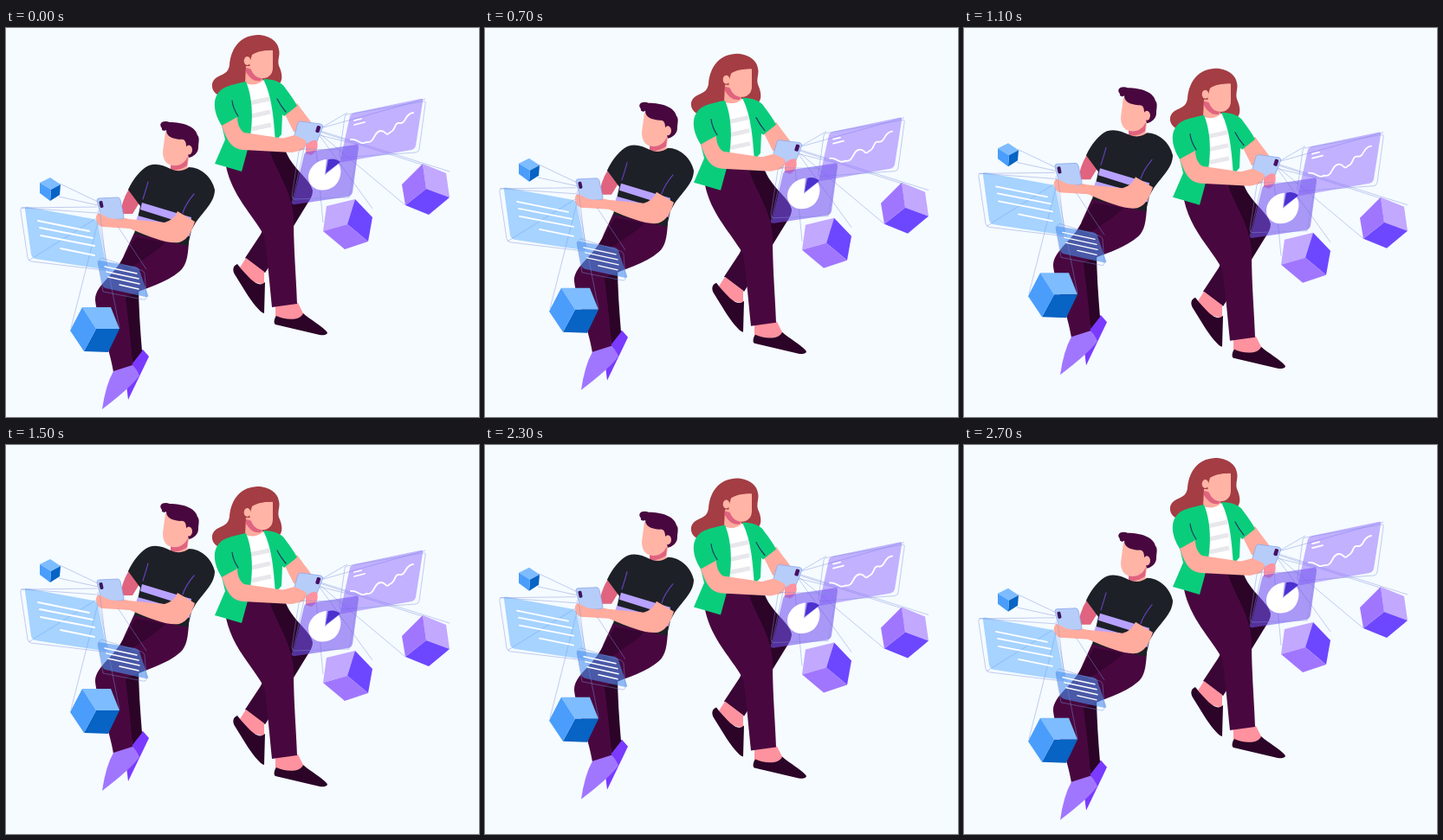
Animation of 546 by 450 pixels, one loop 2.8 s. Source, as an HTML page:

```html
<!DOCTYPE html>
<html lang="en">
<head>
<meta charset="utf-8">
<title>Two people floating with phones</title>
<style>
html, body { margin: 0; width: 100%; height: 100%; overflow: hidden; background: #f5fbff; }
svg { display: block; width: 546px; height: 450px; }
.line { fill: none; stroke: #8190d8; stroke-width: .6; opacity: .75; }
.ink { fill: none; stroke: #fff; stroke-width: 1.8; stroke-linecap: round; stroke-linejoin: round; }
.crease { fill: none; stroke: #243a64; stroke-width: 1.2; stroke-linecap: round; }
.skin { fill: #ffab9e; }
.face { fill: #ffb4a6; }
.shade { fill: #e0637f; }
.pink { fill: #ff929f; }
.plum { fill: #48083f; }
.dark { fill: #2b0428; }
.black { fill: #1d2027; }
.green { fill: #0acd7b; }
.hair { fill: #a43d44; }
.phone { fill: #b7cdf9; stroke: #8ca9ea; stroke-width: .8; stroke-linejoin: round; }
.lilac { fill: #c2a8ff; }
.violet { fill: #a176ff; }
.indigo { fill: #6d47ff; }
.sky { fill: #7dbcff; }
.blue { fill: #4a9dfb; }
.navy { fill: #0763c4; }
</style>
</head>
<body>
<svg viewBox="0 0 546 450">
  <g id="woman">
    <path class="hair" d="M290 48C303 48 314 55 315 65C317 72 312 78 316 86C320 96 319 104 312 107L262 114L244 117C237 113 236 104 241 99C247 93 256 95 258 83C259 68 267 49 290 48Z"/>

    <!-- legs -->
    <path class="dark" d="M300 180H322C329 202 351 214 354 228Q354 235 348 243L299 323L290 290L305 250Z"/>
    <path fill="#3a0635" d="M305 262L325 282L299 323L276 306Z"/>
    <path class="pink" d="M277 306L298 322V337L283 333L270 317Z"/>
    <path class="dark" d="M267 313C262 315 261 320 264 325L277 346C284 357 293 369 298 370L299 334C292 341 283 333 267 313Z"/>
    <path class="pink" d="M311 360L337 358L344 372L330 380L311 377Z"/>
    <path class="dark" d="M312 373C309 377 309 382 311 383L362 395C368 396 373 394 370 391C364 384 352 378 343 370C340 379 322 378 312 373Z"/>
    <path class="plum" d="M276 180H304C311 205 332 231 332 262C332 297 335 329 336 359L307 363C304 333 302 308 298 280C284 255 261 234 254 200Z"/>

    <!-- torso -->
    <path fill="#fff" d="M276 103L300 100L309 166L317 178L279 181Z"/>
    <path fill="none" stroke="#e7e7ec" stroke-width="5" d="M281 127L304 122M283 142L305 137M283 157L306 152"/>
    <path class="skin" d="M277 84H296V101Q288 108 276 104Z"/>
    <path class="shade" d="M277 86L300 92L294 101Q284 103 277 91Z"/>
    <path class="face" d="M281 68L308 65V86C308 95 301 99 294 98C287 97 282 90 281 80Z"/>
    <path class="hair" d="M279 76C276 60 290 55 302 57C309 58 311 64 309 66C302 65 291 66 284 71L282 78Z"/>
    <ellipse class="face" cx="278.500" cy="78" rx="3.800" ry="5"/>
    <path class="skin" d="M322 140L336 127C344 139 352 147 354 153L344 165L332 160Z"/>
    <path class="green" d="M297 99C309 99 319 103 322 109C328 117 333 124 336 130L321 142L319 140L318 163L311 171C309 148 308 121 297 99Z"/>
    <path class="green" d="M277 102C287 126 285 158 278 184L272 206L241 197L253 169L249 153C240 139 238 124 245 115C252 106 265 105 277 102Z"/>
    <path class="crease" d="M261 124Q262 133 268 142M313 122Q317 130 323 137"/>
    <path class="skin" d="M249 153L267 143C267 151 270 158 275 161L322 168L340 165L350 169L343 181L330 184L274 181C260 180 255 170 249 153Z"/>

    <!-- beams -->
    <path class="line" d="M363 156L394 138M363 156L484 122M362 160L480 198M363 159L512 206M362 162L461 245M361 163L423 249M357 169L366 265M345 175L330 243M362 164L407 175"/>

    <!-- phone -->
    <path class="phone" d="M340 148L363 151Q367 152 365 156L358 174Q357 176 354 175L331 171L337 150Q338 148 340 148Z"/>
    <rect x="358" y="153" width="4.500" height="8" rx="1.500" fill="#461064" transform="rotate(17 360 157)"/>
    <path class="pink" d="M346 175Q356 167 359 171Q362 182 352 187L346 185Z"/>
    <path class="skin" d="M318 168L333 164Q343 168 347 171Q346 177 337 181L320 183Z"/>

    <!-- chart card -->
    <path fill="#8e69ff" fill-opacity=".5" d="M402 138L478 122Q482 121 481 125L473 176Q472 180 468 181L389 195Q385 196 386 192L397 142Q398 139 402 138Z"/>
    <path class="line" d="M394 140L481 125Q485 124 484 128L477 180Q477 183 473 184L388 190Q384 190 385 186L391 143Q391 140 394 140Z"/>
    <path class="ink" d="M398 169C407 168 408 176 416 172C426 174 424 159 433 159C439 159 438 166 443 161C451 158 447 149 455 150C462 151 460 139 470 138"/>
    <path class="ink" d="M402 147L410 145M402 152L414 149"/>

    <!-- pie card -->
    <path fill="#7452f0" fill-opacity=".58" d="M349 183L403 175Q407 174 407 178L400 230Q399 234 395 235L334 244Q329 245 331 241L344 187Q345 183 349 183Z"/>
    <path class="line" d="M340 180L402 181Q406 181 405 185L396 236L333 238Q330 238 330 234L338 183Z"/>
    <path fill="#fff" d="M370 192L368 210L384 197C389 204 386 217 379 223C368 231 354 228 350 218C346 206 356 193 370 192Z"/>
    <path fill="#4b31cf" d="M372 192Q380 190 386 195L369 208Z"/>

    <!-- cubes -->
    <path class="lilac" d="M481 197L508 208L512 236L485 226Z"/>
    <path class="indigo" d="M512 236L488 256L461 245L485 226Z"/>
    <path class="violet" d="M461 245L457 221L481 197L485 226Z"/>
    <path class="lilac" d="M370 246L403 238L394 267L366 275Z"/>
    <path class="indigo" d="M403 238L423 259L418 287L394 267Z"/>
    <path class="violet" d="M366 275L394 267L418 287L391 296Z"/>
  </g>

  <g id="man">
    <!-- legs -->
    <path fill="#7a3aff" d="M145 337L158 331L165 339L154 362L141 389L139 372Z"/>
    <path class="dark" d="M134 262L153 254C153 282 155 308 157 333L146 347Z"/>
    <path class="plum" d="M148 196L211 207C210 221 209 233 201 240C185 254 161 260 138 270C141 298 145 325 146 350L124 357C120 330 105 294 103 274C102 256 129 243 137 220Z"/>
    <path class="dark" opacity=".6" d="M150 201L184 207C173 219 155 228 139 240L131 232Z"/>
    <path class="violet" d="M124 356L146 349Q150 352 154 361Q145 374 111 400Q115 372 124 356Z"/>

    <!-- head -->
    <path class="skin" d="M191 106L212 103L209 122Q200 130 190 124Z"/>
    <path class="shade" d="M190 116Q204 117 210 108L209 118Q200 125 190 123Z"/>
    <path class="face" d="M184 79L208 84L210 106C208 115 200 119 192 118C184 117 181 110 181 102Z"/>
    <path class="plum" d="M180 75C175 69 182 65 189 68C204 68 219 73 221 83C224 86 222 92 222 97C222 104 216 108 211 109L208 96C208 90 206 87 201 88C191 87 185 84 185 77C182 79 179 77 180 75Z"/>
    <ellipse class="face" cx="211" cy="100" rx="4" ry="5.500"/>

    <!-- torso -->
    <path class="shade" d="M142 145L154 161L146 174L133 174Q132 162 142 145Z"/>
    <path class="black" d="M165 118C174 115 182 118 190 122C199 126 206 124 211 120C225 120 238 132 241 146C241 160 229 170 219 184L214 193L210 211L148 197L155 165L141 146C147 133 156 122 165 118Z"/>
    <path fill="#b8a2ff" d="M157 161L200 174L214 178L213 186L196 182L155 169ZM152 176L213 193L212 200L150 183Z"/>
    <path class="crease" style="stroke:#6140b4" d="M164 137Q161 148 158 157M217 151Q207 163 204 173"/>
    <path class="skin" d="M198 171L218 183C215 193 210 204 200 207C187 209 169 202 143 191L112 189Q106 188 105 180L117 174L142 180L183 184Q194 181 198 171Z"/>

    <!-- beams -->
    <path class="line" d="M106 160L62 139M106 164L61 154M105 166L17 167M106 170L108 181M107 180L75 306M107 183L131 306M106 178L26 228M124 181L162 238"/>

    <!-- phone -->
    <path class="phone" d="M107 156L129 155Q131 155 132 158L136 177Q136 180 133 180L113 181Q111 181 110 178L105 159Q105 156 107 156Z"/>
    <rect x="108" y="159" width="4" height="8" rx="1.500" fill="#3c1759" transform="rotate(-12 110 163)"/>
    <path class="skin" d="M104 177Q106 171 111 175L119 179L136 181L138 189L112 189Q103 188 104 177Z"/>

    <!-- text card -->
    <path fill="#5eafff" fill-opacity=".52" d="M25 166L101 180Q105 181 106 185L116 235Q116 239 112 238L34 226Q30 225 29 221L22 169Q21 165 25 166Z"/>
    <path class="line" d="M20 167L105 173Q108 174 109 177L116 235Q116 240 112 239L29 229Q26 228 25 225L17 171Q16 167 20 167Z"/>
    <path class="ink" d="M37 182L96 194M39 190L100 202M40 199L102 211M63 214L102 222"/>

    <!-- note card -->
    <path fill="#4b8fee" fill-opacity=".6" d="M108 228L149 235Q153 236 154 239L164 268Q165 271 161 270L115 260Q112 259 111 256L106 231Q106 228 108 228Z"/>
    <path class="line" d="M110 225L156 239Q159 240 160 243L162 270Q162 274 158 273L112 264L106 229Z"/>
    <path class="ink" style="stroke-width:1.400" d="M114 235L151 243M116 241L153 249M118 247L154 255M131 256L153 261"/>

    <!-- cubes -->
    <path class="sky" d="M88 282H121L131 307H104Z"/>
    <path class="navy" d="M104 307H131L118 334L90 333Z"/>
    <path class="blue" d="M88 282L104 307L90 333L74 309Z"/>
    <path class="sky" d="M39 138L51 132L63 140L52 146Z"/>
    <path class="navy" d="M63 140L62 152L51 159L52 146Z"/>
    <path class="blue" d="M39 138L52 146L51 159L39 150Z"/>
  </g>
</svg>
<script>
const woman = document.getElementById('woman');
const man = document.getElementById('man');

const ease = (t, from, span) => {
  const u = Math.min(1, Math.max(0, (t - from) / span));
  return u * u * (3 - 2 * u);
};

// The pose changes ten times a second and skips one beat in seven.
function draw(now) {
  const step = Math.floor(now / 100) % 28;
  const beat = step + Math.floor(step / 6);
  const near = ease(beat, 2.2, 11) - ease(beat, 22.2, 12);
  woman.setAttribute('transform', `translate(0 ${40 * (near - 1)})`);
  man.setAttribute('transform', `translate(0 ${41 * (1 - near)})`);
}

let start;
function tick(now) {
  start ??= now;
  draw(now - start);
  requestAnimationFrame(tick);
}
draw(0);
requestAnimationFrame(tick);
</script>
</body>
</html>
```
